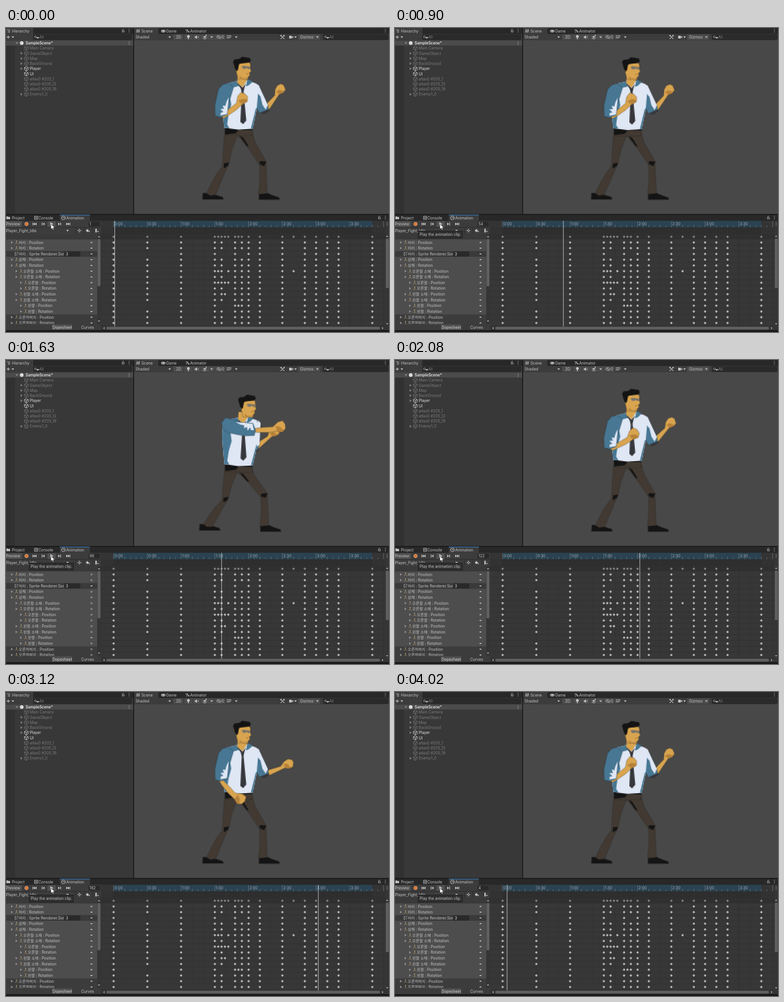
Animation of 840 by 667 pixels, one loop 4.09 s. Source, as an HTML page with a canvas:

```html
<!DOCTYPE html>
<html>
<head>
<meta charset="utf-8">
<style>
html, body { margin: 0; width: 840px; height: 667px; overflow: hidden; background: #383838; }
svg, canvas { position: absolute; left: 0; top: 0; }
canvas { left: 400px; top: 50px; width: 300px; height: 340px; image-rendering: pixelated; }
text { font: 8.4px Inter, "Noto Sans CJK KR", "Noto Sans CJK", sans-serif; white-space: pre; }
.bold { font-weight: 600; }
</style>
</head>
<body>
<svg id="ui" width="840" height="667" viewBox="0 0 840 667"></svg>
<canvas id="man" width="150" height="170"></canvas>
<script>
const ui = document.getElementById('ui');
const INK = '#c4c4c4', DIM = '#7c7c7c';

function add(tag, attrs, parent = ui) {
  const el = document.createElementNS('http://www.w3.org/2000/svg', tag);
  for (const k in attrs) el.setAttribute(k, attrs[k]);
  parent.appendChild(el);
  return el;
}
const rect = (x, y, x2, y2, fill, more) => add('rect', { x, y, width: x2 - x, height: y2 - y, fill, ...more });
const shape = (d, fill, x = 0, y = 0) => add('path', { d, fill, transform: `translate(${x} ${y})` });
const line = (d, stroke = INK, x = 0, y = 0, w = 1) =>
  add('path', { d, stroke, fill: 'none', 'stroke-width': w, transform: `translate(${x} ${y})` });
const dot = (cx, cy, r, fill) => add('circle', { cx, cy, r, fill });
function label(x, y, str, fill = INK, more) {
  const el = add('text', { x, y: y + 3, fill, ...more });
  el.textContent = str;
  return el;
}
const down = (x, y, c = INK) => shape('M-3-1.5H3L0 2Z', c, x, y);
const right = (x, y, c = DIM) => shape('M-2-3L2.5 0L-2 3Z', c, x, y);
const dots = (x, y) => [-3, 0, 3].forEach(d => dot(x, y + d, .8, INK));
const lock = (x, y) => line('M-2.2 .3H2.2V3.4H-2.2ZM-1.4 0V-2Q0-4 1.4-2', INK, x, y, .9);
function search(x, x2) {
  rect(x, 14.5, x2, 25.5, '#2a2a2a', { rx: 2, stroke: '#202020', 'stroke-width': .7 });
  line('M2.2 2.2L-.2-.2A2 2 0 1 0-.5 .2', INK, x + 6.5, 20.5, .9);
  down(x + 10, 21.5);
  label(x + 13, 20, 'All', DIM);
}

// Hierarchy panel
rect(0, 0, 840, 667, '#191919');
rect(0, 0, 279, 13, '#282828');
rect(0, 0, 60, 13, '#3c3c3c');
rect(0, 13, 279, 27, '#3c3c3c');
rect(0, 27, 279, 408, '#383838');
rect(0, 27, 20, 408, '#313131');
rect(0, 27.5, 279, 38.5, '#4b4b4b');
line('M2 4H9M4 6.7H9M4 9.3H9');
label(13, 6.5, 'Hierarchy');
lock(257, 5.5);
dots(270, 6);
line('M1.5 20H8.5M5 16.5V23.5', INK, 0, 0, 1.3);
down(15, 20);
search(60, 276);
down(24, 33, '#909090');
dot(34.5, 33, 4, '#dcdcdc');
label(43, 33, 'SampleScene*', '#e0e0e0', { class: 'bold' });
dots(270, 33);
['Main Camera', '>GameObject', '>Map', '>BackGround', '>Player', 'UI', 'atlas0 #205_1',
 'atlas0 #205_12', 'atlas0 #205_19', '>Enemy1_0'].forEach((name, i) => {
  const y = 44.3 + i * 11.24, c = i == 4 || i == 5 ? '#e2e2e2' : DIM;
  if (name[0] == '>') right(34, y);
  line('M0-4.6L4.2-2.3V2.3L0 4.6L-4.2 2.3V-2.3ZM-4.2-2.3L0 0L4.2-2.3M0 0V4.6', c, 44.5, y, .9);
  label(52, y, name.replace('>', ''), c);
});

// Scene panel
rect(281, 0, 840, 13, '#282828');
rect(281, 0, 334, 13, '#3c3c3c');
rect(281, 13, 840, 27, '#3c3c3c');
rect(281, 27, 840, 408, '#484848');
line('M-2-4L-3 4M2-4L1 4M-4-1.5H4M-4.5 1.5H3.5', INK, 290, 6.5);
label(297, 6.5, 'Scene');
rect(340.5, 4, 349.5, 9.5, INK, { rx: 2.7 });
dot(343, 6.7, 1, '#282828');
dot(347, 6.7, 1, '#282828');
label(351, 6.5, 'Game');
line('M-4-2H0L2 2H5M-1 2H-3', INK, 398, 6.5, 1.6);
label(404, 6.5, 'Animator');
dots(832, 6);
label(284, 20, 'Shaded');
down(359, 20);
[[367, 389], [391, 409], [410, 427], [428, 457], [458, 481], [641, 689]]
  .forEach(([a, b]) => rect(a, 14, b, 26, '#4c4c4c'));
label(373, 20, '2D');
dot(400, 18.5, 3, INK);
rect(399, 21, 401, 24.5, INK);
shape('M-4-1.5H-2L1-4V4L-2 1.5H-4Z', INK, 418, 20);
line('M2-2Q4 0 2 2', INK, 419, 20);
shape('M-4 0L0-2L4 0L0 2ZM-4 2L0 4L4 2V3.2L0 5.2L-4 3.2ZM2-5H4V-2H2Z', INK, 436, 19.5);
down(451, 20);
line('M-5 0Q0-6 5 0Q0 5-5 0M-4-4L4 4', INK, 467, 20);
label(473, 20, '0');
line('M-4-4V4M0-4V4M4-4V1M-4-3H5M-4 1H4', INK, 489, 20, .9);
down(505, 20);
line('M-4 4L4-4M-4-4L4 4M2-4H4V-2M-4-2V-4H-2', INK, 606.5, 20, 1.4);
rect(621, 17, 627, 23, INK, { rx: 1 });
shape('M0 0L3-2.5V2.5Z', INK, 627, 20);
down(635, 20);
label(645, 20, 'Gizmos');
down(683, 20);
search(696, 838);

// Animation panel
rect(0, 410, 840, 423, '#282828');
rect(118, 410, 184, 423, '#3c3c3c');
rect(118, 409.5, 184, 411, '#3d7ab5');
rect(0, 423, 208, 663, '#3c3c3c');
shape('M-4-3H-1L0-2H4V3H-4Z', INK, 5, 416.5);
label(13, 416.5, 'Project');
line('M-3.5-3.5H3.5V3.5H-3.5ZM-2-1.2H2M-2 1H2', INK, 66, 416.5);
label(71, 416.5, 'Console');
line('M0-4A4 4 0 1 0 .1-4M0-2V0H2.5', INK, 126, 416.5, 1.1);
label(132, 416.5, 'Animation');
lock(819, 415.5);
dots(832, 416);
rect(0, 424, 35, 436.5, '#505050');
label(0, 430, 'Preview');
dot(45, 430, 4.3, '#e6c4a8');
dot(45, 430, 3.5, '#d9752f');
rect(91, 424, 109, 436.5, '#505050');
const back = 'M4-3.2L0 0L4 3.2Z', fore = 'M-4-3.2L0 0L-4 3.2Z';
shape(back + 'M0-3.2L-4 0L0 3.2ZM-5-3.2H-4V3.2H-5Z', INK, 63, 430);
shape(back + 'M-2-3.2H-.6V3.2H-2Z', INK, 80.5, 430);
shape('M-3-4L4 0L-3 4Z', INK, 100, 430);
shape(fore + 'M.6-3.2H2V3.2H.6Z', INK, 118.5, 430);
shape(fore + 'M0-3.2L4 0L0 3.2ZM4-3.2H5V3.2H4Z', INK, 136, 430);
rect(181, 424.5, 206, 435.5, '#2a2a2a', { rx: 1.5 });
const counter = label(183, 430, '1');
line('M0 437.5H208M152.5 438V451M170.5 438V451M190.5 438V451', '#2b2b2b');
label(0, 445, 'Player_Fight_Idle');
down(135, 444.5);
line('M0-4.5V-1M0 1V4.5M-4.5 0H-1M1 0H4.5M-2.5 0L0-2.5L2.5 0L0 2.5Z', INK, 161, 444.5, .9);
shape('M-4 0L-.5-3.5L3 0L-.5 3.5ZM2 1.4H3V.4H4V1.4H5V2.4H4V3.4H3V2.4H2Z', INK, 179, 444.5);
shape('M-3-4H0V4H-3ZM1 1.5H2V.5H3V1.5H4V2.5H3V3.5H2V2.5H1Z', INK, 199, 444.5);

// Dope sheet
const tx = f => 236 + f * 2.467;
rect(208, 423, 832, 437, '#343434');
rect(236, 423, 803, 437, '#2a4251');
rect(208, 437, 832, 655, '#373737');
rect(208, 437, 832, 452, '#323232');
rect(208, 452, 832, 464, '#303030');
rect(236, 437, 803, 452, '#2e2e2e');
for (let f = 0; f < 241; f += 5) {
  const x = tx(f), major = f % 30 == 0;
  line(`M${x} ${major ? 424 : f % 10 ? 433.5 : 432}V437`, '#8a979e', 0, 0, .7);
  if (f % 10 == 0) line(`M${x} 437V655`, major ? '#2f2f2f' : '#343434', 0, 0, .8);
  if (major && f < 240) label(x + 2, 430, `${f / 60 | 0}:${f % 60 ? 30 : '00'}`, '#a5acb0');
}
const base = [0, 30, 60, 90, 96, 108, 114, 120, 130, 150, 170, 180, 190, 200, 230];
const rowY = i => 470.5 + i * 12.62;
const diamond = 'M-3 0L0-3L3 0L0 3Z';
const rows = [
  [0, '머리 : Position'], [0, '머리 : Rotation'],
  [0, '머리 : Sprite Renderer.Sorting', [], [30, 96, 114]],
  [0, '상체 : Position'], [0, '상체 : Rotation'],
  [1, '오른팔 소매 : Position', [93, 102, 160]], [1, '오른팔 소매 : Rotation'],
  [2, '오른팔 : Position', [93, 99, 102]], [2, '오른팔 : Rotation'],
  [1, '왼팔 소매 : Position', [99]], [1, '왼팔 소매 : Rotation'],
  [2, '왼팔 : Position', [111], [30, 96]], [2, '왼팔 : Rotation'],
  [0, '오른허벅지 : Position'], [0, '오른허벅지 : Rotation']
];
rect(0, 452, 200, 464, '#3a3a3a');
rect(0, 464, 200, 628.5, '#4d4d4d');
for (const f of [...base, 93, 99, 102, 111, 160]) shape(diamond, '#7d7d7d', tx(f), 458);
const marks = rows.map(([level, name, extra = [], gone = []], i) => {
  const y = rowY(i), x = level * 10;
  const keys = [...base, ...extra].filter(f => !gone.includes(f));
  line(`M208 ${y + 6.3}H832`, '#2f2f2f', 0, 0, .8);
  keys.forEach(f => shape(diamond, '#b2b2b2', tx(f), y));
  if (i == 2) {
    rect(0, y - 6.3, 200, y + 6.3, '#3a3a3a');
    line('M-1-3.5H-3V3.5H-1M1-3.5H3V-1.5M-1 0L1-1.5M0 2H3', INK, 23, y, .9);
  } else {
    right(x + 13, y, '#8b8b8b');
    line('M0-3.5V.8L-3.5 2.8M0 .8L3.5 2.8', '#b99a66', x + 23, y, .8);
    dot(x + 23, y - 3, .9, '#d8d2ac');
  }
  label(x + 28, y, name);
  if (i == 2) {
    rect(127, y - 6, 200, y + 6, '#3a3a3a');
    rect(128, y - 5.5, 163, y + 5.5, '#292929', { rx: 1.5 });
    label(131, y, '3', '#dddddd');
  }
  return { keys, el: add('path', { transform: `translate(187.5 ${y})` }) };
});
rect(0, 649.5, 208, 663, '#3c3c3c');
rect(101, 650.5, 145, 662, '#525252', { rx: 1 });
label(102, 656.5, 'Dopesheet', '#d6d6d6');
label(165, 656.5, 'Curves');
rect(200, 452, 208, 649.5, '#353535');
rect(200.7, 463, 207.2, 567, '#606060', { rx: 3 });
shape('M-2.5 1H2.5L0-1.5Z', INK, 204, 458);
shape('M-2.5-1H2.5L0 1.5Z', INK, 204, 643);
rect(832, 423, 840, 663, '#353535');
dots(836, 430);
rect(833, 462, 839.5, 571, '#606060', { rx: 3 });
shape('M-2.5 1H2.5L0-1.5Z', INK, 836, 457);
shape('M-2.5-1H2.5L0 1.5Z', INK, 836, 649);
rect(208, 655, 832, 663, '#353535');
rect(220, 655.5, 820, 661.5, '#606060', { rx: 3 });
shape('M1-2.5V2.5L-1.5 0Z', INK, 215, 658.5);
shape('M-1-2.5V2.5L1.5 0Z', INK, 826, 658.5);
const head = rect(0, 423, 1, 655, '#dadada');

const tip = add('g', {});
add('rect', { x: 51, y: 445.5, width: 97, height: 15.5, fill: '#2f2f2f', stroke: '#1b1b1b' }, tip);
add('text', { x: 54, y: 456, fill: INK }, tip).textContent = 'Play the animation clip.';
add('path', { d: 'M98.5 430V441.5L101.2 439L103 443L105 442.2L103.2 438.3H107Z', fill: '#fff', stroke: '#222', 'stroke-width': .7 });

// Fighter
const SKIN = '#d8a44f', SHADE = '#b68239', BLUE = '#477793', WHITE = '#dfe6f4',
  DARK = '#36373c', PANTS = '#423a32', BLACK = '#141414';
const art = {
  sleeveB: [[BLUE, 'M546 122L554 125L564 147L574 169L576 182L566 188L555 186L549 175Z'],
    [WHITE, 'M547 122L554 125L564 147L574 169L569 179L562 168L558 150L549 140Z'],
    [DARK, 'M556 186L576 178L577 182L566 189Z']],
  foreB: [[SKIN, 'M565 173L589 148L590 135L595 126L603 123L609 126L613 136L608 142L599 146L578 177L570 182Z'],
    [SHADE, 'M592 140L599 136L608 139L611 135L608 142L599 146Z']],
  thighB: [[PANTS, 'M504 230L539 224L546 250L571 294L565 303L555 299L532 265L512 240Z'],
    [BLACK, 'M512 236L520 240L532 259L528 259ZM557 292L571 293L566 303L556 298Z']],
  shinB: [[PANTS, 'M556 299L570 296L571 320L573 363L554 365L557 330Z']],
  shoeB: [[BLACK, 'M555 363L573 362L584 367L599 372L600 376.5H555Z']],
  thighF: [[PANTS, 'M480 224L511 228L505 242L496 266L488 300L475 304L477 262Z'],
    [BLACK, 'M478 297L489 295L487 302L478 308Z']],
  shinF: [[PANTS, 'M475 303L487 303L480 317L460 366L448 368L440 363L450 342L461 322Z']],
  shoeF: [[BLACK, 'M432 362L446 363L459 366L475 371L477 376H431Z']],
  torso: [[PANTS, 'M480 219H541L539 236H483Z'], [BLACK, 'M480 219H541L540 224H510L504 231L481 234Z'],
    [WHITE, 'M484 122L508 116L530 115L549 122L553 140L550 176L541 221L510 223L479 219L473 165L473 130Z'],
    [BLUE, 'M484 122L508 116L512 127L496 131L491 150L494 168L488 190L485 212L490 220L479 219L473 165L473 130ZM530 112L541 118L532 126L526 128ZM548 176L550 176L541 221L537 221Z'],
    [SKIN, 'M508 104L530 104L528 116L519 130L507 121Z'],
    [DARK, 'M506 119L519 131L526 122L523 131L521 140L527 203L520 211L514 206L517 142L515 133Z']],
  head: [[SKIN, 'M504 86L510 78L533 74L536 80V90L538 95L534 98L535 103L531 108L530 113L509 112L505 96Z'],
    [SHADE, 'M526 100L534 99L534 101L527 102ZM512 105L520 110L530 109L530 111H514Z'],
    [BLACK, 'M498 74L501 69L511 68L518 63L535 66L537 72L533 76L514 78L511 80L509 91L506 95L502 88Z'],
    ['#77746a', 'M517 84L522 83L536 85V89L531 90L528 87L525 90L519 89Z']],
  sleeveF: [[BLUE, 'M488 121L475 124L466 135L459 170L460 193L472 196L487 190L488 168L493 152L499 130Z'],
    [WHITE, 'M489 152L488 168L486 189L472 192L472 186L478 184L471 178L479 177L476 170L482 171L484 162Z']],
  foreF: [[SKIN, 'M472 194L488 180L507 165L510 150L517 142L526 145L532 152L531 162L520 168L507 180L488 193L479 198Z'],
    [SHADE, 'M511 160L521 156L531 158L530 163L520 168Z']]
};
for (const k in art) art[k] = art[k].map(([c, d]) => [c, new Path2D(d)]);

// Joint angles in degrees; everything else is an offset from the idle stance.
const idle = { x: 0, y: 0, r: 0, hx: 0, hy: 0, sf: 99, ff: -41, sb: 70, fb: -53,
  kx: 0, ky: 0, ax: 0, ay: 0, fr: 0, jx: 0, jy: 0, bx: 0, by: 0 };
const low = { y: 9, kx: -1, ky: 5, ax: -7, ay: -2, jx: 3, bx: 3 };
const cross = { ...low, x: 2, r: 8, sf: 118, ff: -45, sb: 0, fb: -3 };
const poses = [
  [0, {}], [30, low], [60, {}], [90, {}],
  [96, { ...low, y: 10, r: 1, hx: 9, hy: 3, sf: 8, ff: -6, sb: 98, fb: -39 }],
  [108, cross], [114, cross],
  [120, { ff: -31, fb: -48 }], [130, {}],
  [150, { y: 9, sf: 143, ff: 78, sb: 55, fb: -45, kx: -5, ky: -2, ax: -18, ay: -6, fr: 9, jx: 4, jy: -3, bx: 6, by: -4 }],
  [180, { ff: 48, fb: -22 }], [200, {}], [230, {}]
].map(([f, p]) => [f, { ...idle, ...p }]);

function poseAt(f) {
  const i = poses.findIndex(p => p[0] > f);
  const [f0, a] = poses[i - 1], [f1, b] = poses[i];
  const u = (f - f0) / (f1 - f0), e = u * u * (3 - 2 * u), p = {};
  for (const k in a) p[k] = a[k] + (b[k] - a[k]) * e;
  return p;
}

const ctx = document.getElementById('man').getContext('2d');
const rad = d => d * Math.PI / 180;
const gap = (p, q) => Math.hypot(q[0] - p[0], q[1] - p[1]);
const slope = (p, q) => Math.atan2(q[1] - p[1], q[0] - p[0]);
const reach = ([x, y], len, deg) => [x + len * Math.cos(rad(deg)), y + len * Math.sin(rad(deg))];

function paint(name) {
  ctx.lineWidth = .9;
  art[name].forEach(([c, path], i) => {
    ctx.fillStyle = c;
    ctx.fill(path);
    if (!i) { ctx.strokeStyle = 'rgba(30,30,30,.5)'; ctx.stroke(path); }
  });
}
// Moves a part so that its bone a-b lies on A-B.
function bone(name, a, b, A, B) {
  ctx.save();
  ctx.translate(...A);
  ctx.rotate(slope(A, B));
  ctx.scale(gap(A, B) / gap(a, b), 1);
  ctx.rotate(-slope(a, b));
  ctx.translate(-a[0], -a[1]);
  paint(name);
  ctx.restore();
}
function arm(side, shoulder, elbow, fist, S, upper, lower) {
  const E = reach(S, gap(shoulder, elbow), upper);
  const F = reach(E, gap(elbow, fist), lower);
  bone('fore' + side, elbow, fist, E, F);
  bone('sleeve' + side, shoulder, elbow, S, E);
}
function leg(side, hip, knee, ankle, H, K, A, turn) {
  bone('shoe' + side, ankle, [ankle[0] + 1, ankle[1]], A, reach(A, 1, turn));
  bone('shin' + side, knee, ankle, K, A);
  bone('thigh' + side, hip, knee, H, K);
}
function drawMan(f) {
  const p = poseAt(f), c = Math.cos(rad(p.r)), s = Math.sin(rad(p.r));
  const body = ([x, y]) => [510 + (x - 510) * c - (y - 228) * s + p.x, 228 + (x - 510) * s + (y - 228) * c + p.y];
  const hip = ([x, y]) => [x + p.x, y + p.y];
  ctx.setTransform(.5, 0, 0, .5, -200, -25);
  ctx.clearRect(400, 50, 300, 340);
  const sB = [550, 132], sF = [483, 133], waist = [510, 228], neck = [518, 115];
  arm('B', sB, [567, 180], [602, 134], body(sB), p.sb, p.fb);
  leg('B', [522, 234], [563, 298], [564, 364], hip([522, 234]), [563 + p.jx, 298 + p.jy], [564 + p.bx, 364 + p.by], 0);
  leg('F', [494, 232], [482, 302], [447, 364], hip([494, 232]), [482 + p.kx, 302 + p.ky], [447 + p.ax, 364 + p.ay], p.fr);
  bone('torso', waist, neck, body(waist), body(neck));
  const [nx, ny] = body(neck), N = [nx + p.hx, ny + p.hy];
  bone('head', neck, [neck[0] + 1, neck[1]], N, [N[0] + 1, N[1]]);
  arm('F', sF, [475, 192], [521, 153], body(sF), p.sf, p.ff);
}

function stepAt(t) {
  const q = Math.floor(t / 260), r = t % 260;
  return q * 4 + (r >= 190 ? 3 : r >= 120 ? 2 : r >= (q < 5 ? 50 : 70) ? 1 : 0);
}
let last = -1;
function render() {
  const n = stepAt(performance.now() % 4090);
  if (n != last) {
    last = n;
    const f = (n ? Math.floor(3.75 * n + 2.25) : 1) % 230;
    counter.textContent = f;
    head.setAttribute('x', tx(f) - .5);
    tip.setAttribute('visibility', n ? 'visible' : 'hidden');
    for (const { keys, el } of marks) {
      const on = keys.includes(f);
      el.setAttribute('d', on ? 'M-2 0L0-2L2 0L0 2Z' : 'M-1.6-1H1.6L2.4 0L1.6 1H-1.6L-2.4 0Z');
      el.setAttribute('fill', on ? 'none' : '#c4c4c4');
      el.setAttribute('stroke', on ? '#c4c4c4' : 'none');
    }
    drawMan(f);
  }
  requestAnimationFrame(render);
}
render();
</script>
</body>
</html>
```
